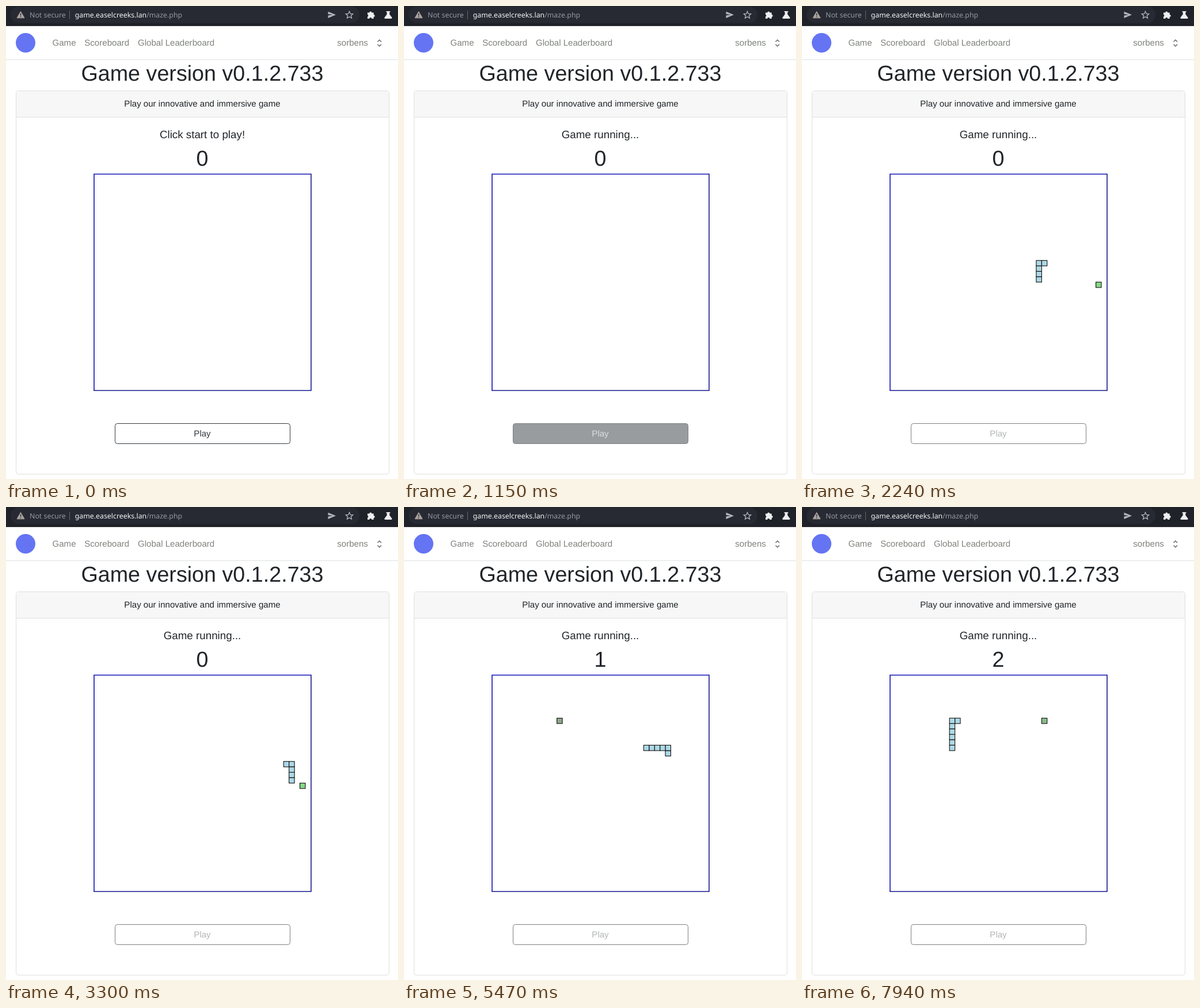
An HTML page that plays this animation: 681x823 px, repeating every 8 s.

```html
<!DOCTYPE html>
<html lang="en">
<head>
<meta charset="utf-8">
<title>Game</title>
<style>
html, body { margin: 0; width: 100%; height: 100%; overflow: hidden; background: #fff; }
svg { display: block; width: 681px; height: 823px; }
text { font: 15.07px "Liberation Sans", Arial, sans-serif; fill: #212529; text-rendering: geometricPrecision; }
.mid { text-anchor: middle; }
.big { font-size: 37.7px; }
.status { font-size: 18.8px; }
.nav text { fill: #7f837c; }
.url text { font: 12.35px "Noto Sans", sans-serif; fill: #9497a3; }
.url .host { fill: #f4f5f7; }
#cells rect { stroke: #111; stroke-width: 1.1; }
.face { fill: #fff; stroke: #343a40; animation: face 8s linear infinite; }
.label { fill: #343a40; animation: label 8s linear infinite; }

/* hover fades in, the click disables the button, then it fades out */
@keyframes face {
  0%, 10.24% { fill: #fff; stroke: #343a40; }
  10.25% { fill: #e9eaea; stroke: #343a40; }
  12%, 13.9% { fill: #343a40; stroke: #343a40; }
  13.91% { fill: #7b7f82; stroke: #7b7f82; }
  14.375% { fill: #989b9e; stroke: #7b7f82; }
  15.75%, 100% { fill: #fff; stroke: #7b7f82; }
}
@keyframes label {
  0%, 10.24% { fill: #343a40; }
  10.25% { fill: #8f9293; }
  12%, 13.9% { fill: #fff; }
  14.375% { fill: #dcddde; }
  15.75%, 100% { fill: #b3b5b6; }
}
</style>
</head>
<body>
<svg viewBox="0 0 681 823">
  <rect width="681" height="34.5" fill="#20222a"/>
  <rect x="8" y="1" width="606" height="28.5" rx="14" fill="#282a33"/>
  <rect y="33.5" width="681" height="1.2" fill="#15161b"/>
  <g class="url">
    <path d="M25.5 9.5 32 20.8H19z" fill="#aaa39e" stroke="#aaa39e" stroke-linejoin="round"/>
    <path d="M25.5 12.8v4M25.5 18v1.6" stroke="#282a33" stroke-width="1.4"/>
    <text x="41" y="20">Not secure</text>
    <path d="M110.5 8v15" stroke="#62656f"/>
    <text x="119.7" y="20"><tspan class="host">game.easelcreeks.lan</tspan>/maze.php</text>
  </g>
  <path d="M559.5 9.8 573 15.3 559.5 21v-4.4l8-1.3-8-1.2z" fill="#b5b7be"/>
  <path d="m596.5 9.3 1.8 4.1 4.4.4-3.3 2.9 1 4.4-3.9-2.3-3.9 2.3 1-4.4-3.3-2.9 4.4-.4z" fill="none" stroke="#b5b7be" stroke-width="1.3"/>
  <path d="M628 11.5h3.3a2 2 0 0 1 4 0h3.4v3.4a2 2 0 0 1 0 4v3.1h-3.4a2 2 0 0 0-4 0H628v-3.4a2 2 0 0 0 0-3.8z" fill="#eeeff1"/>
  <path d="M660.5 9h7v1.5h-1.2v4l4.2 5.6q.8 1.6-1 1.9h-11q-1.8-.3-1-1.9l4.2-5.6v-4h-1.2z" fill="#eeeff1"/>

  <g class="nav">
    <path d="M0 93.5h681" stroke="#dfe1e3"/>
    <circle cx="34" cy="64" r="17" fill="#6574f3"/>
    <text x="80.5" y="69">Game</text>
    <text x="136.3" y="69">Scoreboard</text>
    <text x="229" y="69">Global Leaderboard</text>
    <text x="575.3" y="69">sorbens</text>
    <path d="m645.5 62.3 3.3-3.3 3.3 3.3m-6.6 4.4 3.3 3.3 3.3-3.3" fill="none" stroke="#5f635e" stroke-width="1.3"/>
  </g>

  <text class="mid big" x="341" y="130">Game version v0.1.2.733</text>
  <rect x="17.5" y="147.5" width="648" height="667" rx="4" fill="#fff" stroke="#dfdfdf"/>
  <path d="M18 193V151.500q0-3.500 3.500-3.500h640q3.500 0 3.500 3.500V193z" fill="#f7f7f7"/>
  <path d="M18 193.500h647" stroke="#dfdfdf"/>
  <text class="mid" x="341" y="175">Play our innovative and immersive game</text>
  <text class="mid status" id="status" x="341" y="230">Click start to play!</text>
  <text class="mid big" id="score" x="341" y="278">0</text>

  <g id="cells"></g>
  <g fill="none" stroke-width="1.6">
    <path d="M153 669V292.500H530" stroke="#1010b4"/>
    <path d="M530 291.700V669H152.200" stroke="#18188e"/>
  </g>

  <rect class="face" x="189.500" y="726.500" width="304" height="35" rx="4"/>
  <text class="mid label" x="341" y="749">Play</text>
</svg>
<script>
const LOOP = 8000, CLICK = 1112;
const CELL = 9.42, LEFT = 152.6, TOP = 292;
const FIRST = -5, START_LENGTH = 5;
const ROUTE = "R7 U4 R9 D4 R3 U6 L7 U1 L4 U1 L5 U4 L12 D5";
const STEP = { R: [1, 0], L: [-1, 0], U: [0, -1], D: [0, 1] };
const FOODS = [
  { at: [38, 20], fill: "#84d884" },
  { at: [12, 8], fill: "#8fa88b" },
  { at: [28, 8], fill: "#88be88" }
];
// [move, time in ms]; moves between two marks are evenly spaced
const MARKS = [[-5, 1200], [-1, 1580], [0, 1660], [9, 2540], [18, 3400], [27, 4240],
  [36, 5110], [45, 5950], [54, 6800], [63, 7660], [66, 7940]];

const trail = Array.from({ length: START_LENGTH }, (_, i) => [16 + i, 20]);
for (const leg of ROUTE.split(" ")) {
  const [dx, dy] = STEP[leg[0]];
  for (let n = +leg.slice(1); n > 0; n--) {
    const [x, y] = trail[trail.length - 1];
    trail.push([x + dx, y + dy]);
  }
}

const moveTimes = [];
MARKS.slice(1).forEach(([toMove, toTime], i) => {
  const [move, time] = MARKS[i];
  for (let m = move; m < toMove; m++) {
    const exact = time + (toTime - time) * (m - move) / (toMove - move);
    moveTimes.push(Math.floor(exact / 10) * 10);
  }
});
moveTimes.push(MARKS[MARKS.length - 1][1]);

const same = (a, b) => a[0] === b[0] && a[1] === b[1];
const square = ([x, y], fill) =>
  `<rect x="${LEFT + x * CELL}" y="${TOP + y * CELL}" width="${CELL}" height="${CELL}" fill="${fill}"/>`;

const [status, score, cells] = ["status", "score", "cells"].map(id => document.getElementById(id));

function board(moves) {
  if (!moves) return { points: 0, svg: "" };
  const end = START_LENGTH + moves;
  let points = 0;
  for (const cell of trail.slice(START_LENGTH, end))
    if (same(cell, FOODS[points].at)) points++;
  const snake = trail.slice(end - START_LENGTH - points, end);
  const food = FOODS[points];
  return { points, svg: square(food.at, food.fill) + snake.map(c => square(c, "#add8e6")).join("") };
}

let start, shown = -1;
function draw(now) {
  start ??= now;
  const t = (now - start) % LOOP;
  const text = t < CLICK ? "Click start to play!" : "Game running...";
  if (status.textContent !== text) status.textContent = text;
  const moves = moveTimes.filter(time => time <= t).length;
  if (moves !== shown) {
    const { points, svg } = board(moves);
    score.textContent = points;
    cells.innerHTML = svg;
    shown = moves;
  }
  requestAnimationFrame(draw);
}
requestAnimationFrame(draw);
</script>
</body>
</html>
```
